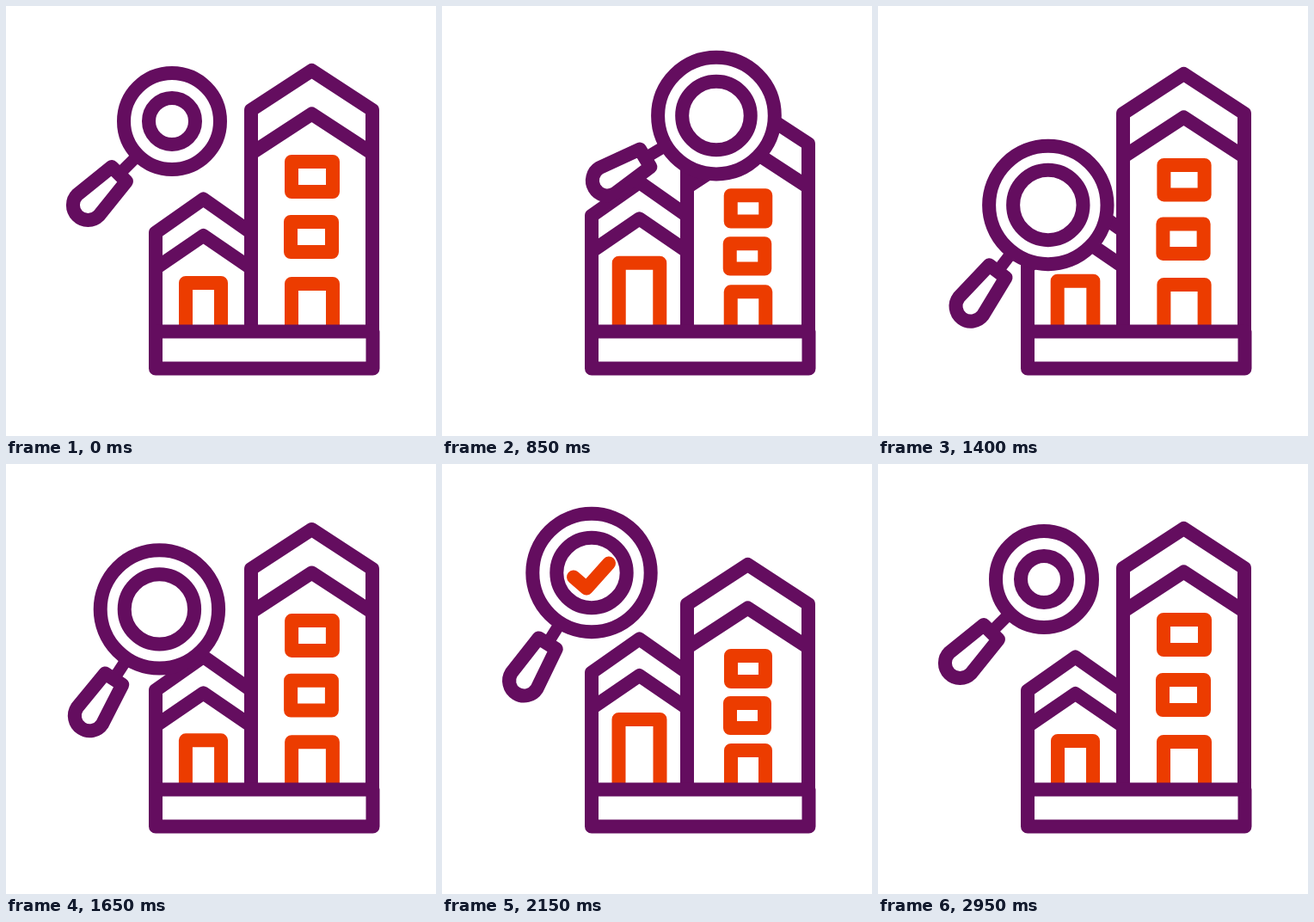
Animation of 500x500 px, one loop 3000 ms. Source, as an HTML page:

```html
<!DOCTYPE html>
<html lang="en">
<head>
<meta charset="utf-8">
<title>Building search</title>
<style>
  html, body { margin: 0; width: 100%; height: 100%; overflow: hidden; background: #fff; }
  svg { display: block; width: 100vw; height: 100vh; }
  path, circle { fill: none; stroke: #640d5f; stroke-width: 16; stroke-linejoin: round; }
  .hot { stroke: #ec3c00; }
  .solid { fill: #fff; }
</style>
</head>
<body>
<svg viewBox="0 0 500 500">
  <path id="openings" class="hot"/>
  <path id="walls"/>
  <path d="M174 378.5H426.5V421.5H174Z"/>
  <g id="glass">
    <g id="handle">
      <path id="rod" style="stroke-width:14"/>
      <path id="grip" class="solid"/>
    </g>
    <circle id="rim" class="solid"/>
    <circle id="ring"/>
    <path id="check" class="hot" d="M-21 5L-6 18L20 -11" pathLength="100" stroke-linecap="round"/>
  </g>
</svg>
<script>
const LOOP = 3000;
const $ = id => document.getElementById(id);
const set = (id, attrs) => {
  for (const k in attrs) $(id).setAttribute(k, attrs[k]);
};

// Eased 0..1 between two times
const ramp = (t, a, b) => {
  const p = Math.min(1, Math.max(0, (t - a) / (b - a)));
  return (1 - Math.cos(Math.PI * p)) / 2;
};

// Key poses of the glass: time, x, y, handle angle
const poses = [
  [100, 193, 134, 45],
  [700, 291, 122.5, 56.5],
  [950, 328, 141, 60],
  [1300, 212, 240, 40],
  [1900, 174, 126.5, 32]
];

// Speed at a pose; zero at the ends and at turning points
function speed(i, c) {
  const a = poses[i - 1], b = poses[i], d = poses[i + 1];
  if (!a || !d || (b[c] - a[c]) * (d[c] - b[c]) <= 0) return 0;
  return (d[c] - a[c]) / (d[0] - a[0]);
}

// Smooth curve through the poses, then an eased return to the first
function follow(t, c) {
  const first = poses[0], last = poses[poses.length - 1];
  if (t <= first[0]) return first[c];
  if (t >= last[0]) return last[c] + (first[c] - last[c]) * ramp(t, 2450, 2950);
  const i = poses.findIndex(pose => pose[0] > t) - 1;
  const a = poses[i], b = poses[i + 1], h = b[0] - a[0];
  const p = (t - a[0]) / h, q = 1 - p;
  return q * q * (1 + 2 * p) * a[c] + p * p * (1 + 2 * q) * b[c]
    + h * p * q * (q * speed(i, c) - p * speed(i + 1, c));
}

const box = (l, t, r, b) => `M${l} ${t}H${r}V${b}H${l}Z`;
const door = (l, t, r) => `M${l} 379V${t}H${r}V379`;
const roof = (l, r, top, drop) => `M${l} ${top + drop}L${(l + r) / 2} ${top}L${r} ${top + drop}`;

function drawBuildings(t) {
  const u = ramp(t, 100, 1000) - ramp(t, 1000, 1500) + ramp(t, 1600, 2100) - ramp(t, 2150, 2720);
  const tower = 75 + 42 * u, house = 224.5 - 21 * u, inset = 4 * u;
  set("walls", { d:
    `M285 379V${tower + 46}M426 379V${tower + 46}M174 379V${house + 39}`
    + roof(285, 426, tower, 46) + "V379" + "M285 379" + `V${tower + 46}L355.5 ${tower}`
    + roof(285, 426, tower + 50.5, 46)
    + `M174 379V${house + 39}L229.5 ${house}L285 ${house + 39}`
    + roof(174, 285, house + 42.5, 38)
  });
  set("openings", { d:
    box(332 + inset, 181 + 42 * u, 380 - inset, 216 + 37 * u)
    + box(331 + inset, 251 + 27 * u, 379 - inset, 286 + 21 * u)
    + door(332 + inset, 323 + 10 * u, 380 - inset)
    + door(209 - 3.5 * u, 322 - 25 * u, 250 + 3.5 * u)
  });
}

function drawGlass(t) {
  const zoom = ramp(t, 100, 1000) - ramp(t, 2290, 2870);
  const top = 87 + 10 * zoom, end = top + 51;
  set("glass", { transform: `translate(${follow(t, 1)} ${follow(t, 2)})` });
  set("handle", { transform: `rotate(${follow(t, 3)})` });
  set("rod", { d: `M0 50V${top}` });
  set("grip", { d: `M-12 ${top}H12L17.5 ${end}A17.5 17.5 0 0 1 -17.5 ${end}Z` });
  set("rim", { r: 56 + 12.7 * zoom });
  set("ring", { r: 27 + 13.7 * zoom });
  const drawn = 100 * (ramp(t, 1840, 2100) - ramp(t, 2250, 2450));
  set("check", {
    "stroke-dasharray": `${Math.max(0.01, drawn)} 300`,
    visibility: t >= 1840 && t < 2450 ? "visible" : "hidden"
  });
}

const start = performance.now();
function frame() {
  const t = (performance.now() - start) % LOOP;
  drawBuildings(t);
  drawGlass(t);
  requestAnimationFrame(frame);
}
frame();
</script>
</body>
</html>
```
